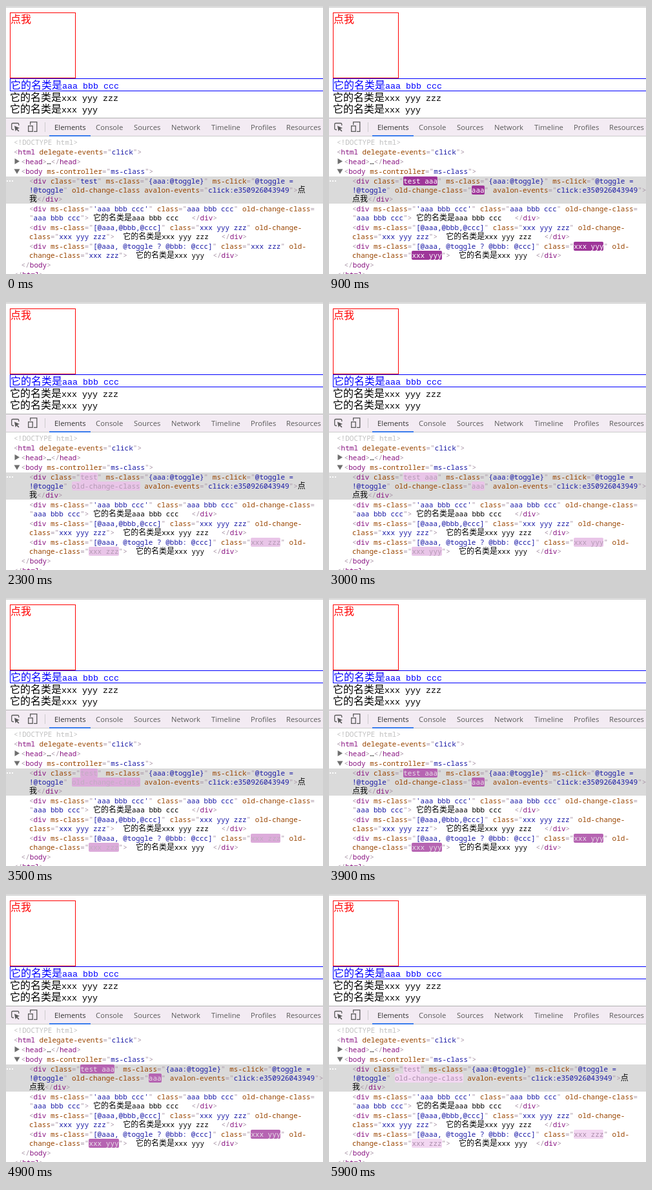
These frames come from a looping animation (491x415 px, 6 s). An HTML page:

```html
<!DOCTYPE html>
<html lang="zh-CN">
<head>
<meta charset="utf-8">
<title>ms-class</title>
<style>
html, body { margin: 0; width: 100%; height: 100%; overflow: hidden; background: #fff; }
svg { display: block; }
text { white-space: pre; }
.page { font: 300 16px "Noto Sans CJK SC", "Noto Sans CJK", sans-serif; }
.page .lat { font: 13.33px "Liberation Mono", monospace; }
.tabs { font: 11.3px "Open Sans", sans-serif; fill: #5a5a5a; }
.code { font: 11px "Noto Sans Mono", monospace; }
.code .cjk { font: 12px "Noto Sans CJK SC", "Noto Sans CJK", sans-serif; }
.d { fill: #c0c0c0; }
.p { fill: rgb(168,148,166); }
.t { fill: rgb(136,18,128); }
.n { fill: rgb(153,69,0); }
.v { fill: rgb(26,26,166); }
.x { fill: #000; }
</style>
</head>
<body>
<svg width="491" height="415" viewBox="0 0 491 415" xmlns="http://www.w3.org/2000/svg">
  <rect width="491" height="415" fill="#fff"/>
  <rect y="1" width="491" height="1" fill="#a9a9a9"/>
  <g class="page">
    <rect x="6.5" y="10.5" width="101" height="101" fill="none" stroke="#f00"/>
    <text x="7" y="26" fill="#f00">点我</text>
    <rect x="6.5" y="112.5" width="490" height="19" fill="none" stroke="#00f"/>
    <text x="7" y="128" fill="#00f">它的名类是<tspan class="lat">aaa bbb ccc</tspan></text>
    <text x="6" y="147">它的名类是<tspan class="lat">xxx yyy zzz</tspan></text>
    <text x="6" y="165">它的名类是<tspan class="lat">xxx yyy</tspan></text>
  </g>
  <rect y="173" width="491" height="29" fill="#f3ebf3"/>
  <rect y="173" width="491" height="1" fill="#b0b0b0"/>
  <rect y="201" width="491" height="1" fill="#ccc"/>
  <rect x="67" y="200" width="64" height="2" fill="#3b7ded"/>
  <rect x="60" y="180" width="1" height="15" fill="#ccc"/>
  <g fill="none" stroke="#5a5a5a" stroke-width="1.3">
    <path d="M12 191.5H10.5Q8.7 191.5 8.7 189.7V183.3Q8.7 181.5 10.5 181.5H18Q19.8 181.5 19.8 183.3V185"/>
    <path d="M13 185.5L21 189L17.6 190.2L20.5 193.4L19.3 194.5L16.4 191.4L14.7 194Z" fill="#5a5a5a" stroke="none"/>
    <path d="M37.7 184V179.7H47.8V194.3H43"/>
    <rect x="34.7" y="185.7" width="6.5" height="8.6"/>
  </g>
  <g class="tabs" id="tabs"></g>
  <rect y="264" width="491" height="42" fill="#dadada"/>
  <g fill="#fff"><rect x="1" y="270" width="2" height="2"/><rect x="5" y="270" width="2" height="2"/><rect x="9" y="270" width="2" height="2"/></g>
  <path d="M13.5 236L21 240.5L13.5 245ZM12.5 252.5H21.5L17 260Z" fill="#6e6e6e"/>
  <g class="code" id="code"></g>
</svg>
<script>
const LOOP = 6000, STEP = 100, CHAR = 6.6, WIDE = 12;
const FADE = 1120; // time from full purple to pale pink
const CLICKS = [900, 1700, 2400, 3100, 3800, 4300, 4800, 5000];
const code = document.getElementById('code');

function add(parent, tag, attrs, text) {
  const el = document.createElementNS('http://www.w3.org/2000/svg', tag);
  for (const k in attrs) el.setAttribute(k, attrs[k]);
  if (text !== undefined) el.textContent = text;
  return parent.appendChild(el);
}

const tabs = { Elements: 75, Console: 139, Sources: 198, Network: 256, Timeline: 318, Profiles: 379, Resources: 434 };
for (const name in tabs) {
  const a = { x: tabs[name], y: 192 };
  if (name === 'Elements') a.fill = '#333';
  add(document.getElementById('tabs'), 'text', a, name);
}

// cubic-bezier(0, 0, 0.2, 1)
function ease(x) {
  let lo = 0, hi = 1;
  for (let i = 0; i < 30; i++) {
    const s = (lo + hi) / 2;
    if (0.6 * s * s + 0.4 * s * s * s < x) lo = s; else hi = s;
  }
  return lo * lo * (3 - 2 * lo);
}

const mix = (a, b, k) => `rgb(${a.map((v, i) => Math.round(v + (b[i] - v) * k))})`;

// "~" plus a letter switches the colour class; "~V" and "~N" can be highlighted.
const attr = (name, value, kind = 'v') => `~n${name}~p="~${kind}${value}~p"`;
const open = '~p<~tdiv ', close = '~p</~tdiv~p>', label = '~x它的名类是';

function lines(on) {
  const cls = on ? 'test aaa' : 'test';
  const pair = on ? 'xxx yyy' : 'xxx zzz';
  const old = on ? attr('old-change-class', 'aaa', 'V') : '~Nold-change-class';
  return [
    [12, 204, '~d<!DOCTYPE html>'],
    [12, 219, `~p<~thtml ${attr('delegate-events', 'click')}>`],
    [23.6, 234, '~p<~thead~p>~x…~p</~thead~p>'],
    [23.6, 249, `~p<~tbody ${attr('ms-controller', 'ms-class')}>`],
    [36, 264, `${open}${attr('class', cls, 'V')} ${attr('ms-class', '{aaa:@toggle}')} ~nms-click~p="~v@toggle =`],
    [36, 278, `~v!@toggle~p" ${old}~p ${attr('avalon-events', 'click:e350926043949')}>${on ? '' : '~x点'}`],
    [36, 292, `~x${on ? '点' : ''}我${close}`],
    [36, 307, `${open}${attr('ms-class', "'aaa bbb ccc'")} ${attr('class', 'aaa bbb ccc')} ~nold-change-class~p=`],
    [36, 321, `~p"~vaaa bbb ccc~p"> ${label}aaa bbb ccc   ${close}`],
    [36, 336, `${open}${attr('ms-class', '[@aaa,@bbb,@ccc]')} ${attr('class', 'xxx yyy zzz')} ~nold-change-`],
    [36, 350, `${attr('class', 'xxx yyy zzz')}>  ${label}xxx yyy zzz   ${close}`],
    [36, 365, `${open}${attr('ms-class', '[@aaa, @toggle ? @bbb: @ccc]')} ${attr('class', pair, 'V')} ~nold-`],
    [36, 379, `${attr('change-class', pair, 'V')}>  ${label}xxx yyy  ${close}`],
    [23.6, 394, '~p</~tbody~p>'],
    [12, 409, '~p</~thtml~p>']
  ];
}

function drawLine([x, y, src], fade) {
  for (const part of src.split('~').slice(1)) {
    const kind = part[0], hot = fade !== null && /[VN]/.test(kind);
    for (const run of part.slice(1).match(/[\u4e00-\u9fff]+|[^\u4e00-\u9fff]+/g) || []) {
      const cjk = /[\u4e00-\u9fff]/.test(run);
      const w = run.length * (cjk ? WIDE : CHAR);
      const a = { x, y: y + 11, class: kind.toLowerCase() + (cjk ? ' cjk' : '') };
      if (hot) {
        const left = Math.round(x), right = Math.round(x + w);
        add(code, 'rect', { x: left, y, width: right - left, height: 14, rx: 2, fill: mix([158, 54, 153], [245, 219, 244], fade) });
        a.style = 'fill:' + mix([255, 255, 255], [168, 138, 168], fade);
      }
      add(code, 'text', a, run);
      x += w;
    }
  }
}

let shown = -1;
function render(ms) {
  const t = Math.floor(ms % LOOP / STEP) * STEP;
  if (t === shown) return;
  shown = t;
  const past = CLICKS.filter(c => c <= t);
  const fade = past.length ? ease(Math.min(1, (t - past[past.length - 1]) / FADE)) : null;
  code.textContent = '';
  for (const line of lines(past.length % 2 === 1)) drawLine(line, fade);
}

const start = performance.now();
function tick() {
  render(performance.now() - start);
  requestAnimationFrame(tick);
}
tick();
</script>
</body>
</html>
```
